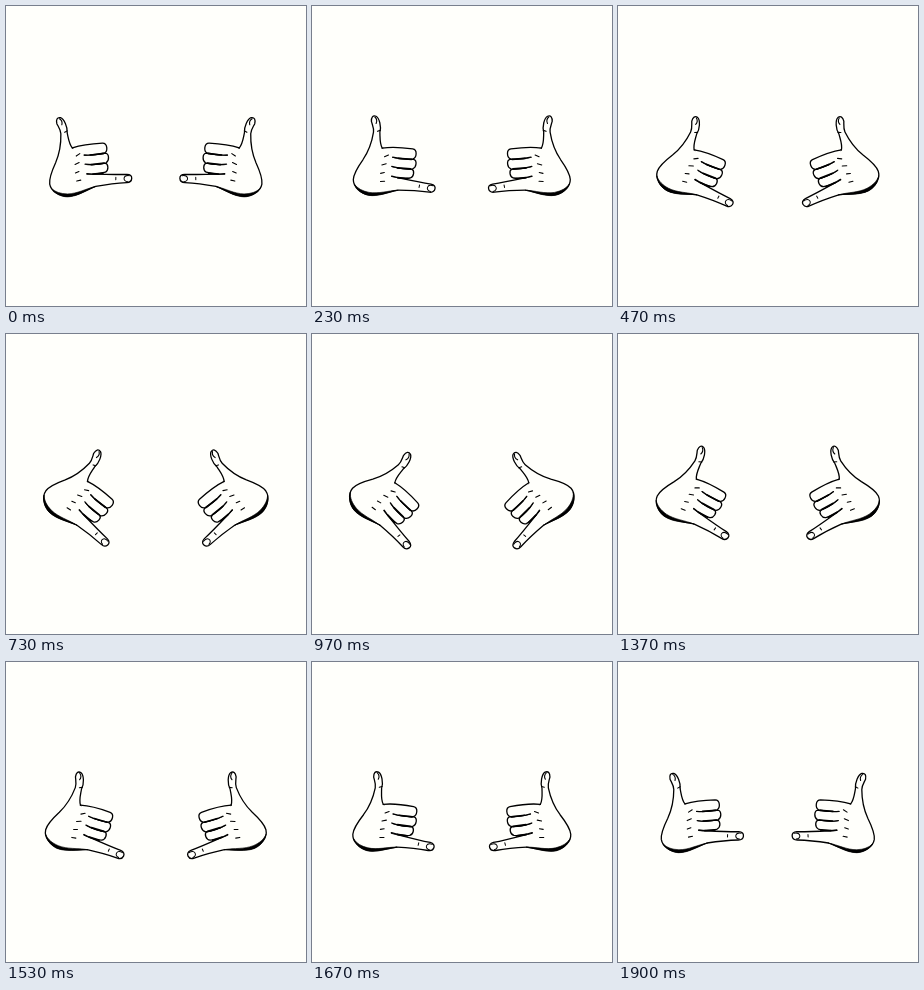
Recreate the animation shown at these times as an HTML page. Size 300 by 300 pixels, loop 1930 ms.

```html
<!DOCTYPE html>
<html>
<head>
<meta charset="utf-8">
<style>
  html, body { margin: 0; width: 100%; height: 100%; overflow: hidden; background: #fffffb; }
  svg { display: block; width: 100vw; height: 100vh; }
</style>
</head>
<body>
<svg viewBox="0 0 300 300">
  <defs>
    <g id="hand" fill="none" stroke="#000" stroke-width="1.3" stroke-linecap="round" stroke-linejoin="round">
      <!-- palm and thumb -->
      <path fill="#fffffb" d="M66 142C62.5 138 62 133 60.5 127C61 121 57 113 53.5 112
        C50 111.5 49 114 50 118C51.5 121 54 124 54.2 128C54.6 137 54 146 49.5 157
        C46 165 43 172 44 178.5C45.5 186 54 190.5 62 190.5C72 190 80 184 90 180L97 166L84 142Z"/>
      <!-- little finger -->
      <path fill="#fffffb" stroke="none" d="M78 167L122 167.2L125.8 171L122 175.4L90 180Z"/>
      <path d="M81 167.8C94 167.8 108 168 121 167.3C124.5 167.3 126 169 125.9 171.3
        C125.8 174 124.2 175.4 121 175.6C110 176.4 100 178 90 180"/>
      <path stroke-width="1" d="M123.5 168.6C117 167.6 116.5 174.6 122 174.6M110 170.5V173"/>
      <!-- folded fingers -->
      <path fill="#fffffb" d="M80 158C87 158.8 93 157.4 99 156.6C102.4 157.2 103 163.5 99.4 165.6C94 167.6 87 168 81 167.4"/>
      <path fill="#fffffb" d="M78 148.8C86 149 93 147.4 99 146.6C103 147 103.4 154 100 156.2C94 158 86 158.6 79 158"/>
      <path fill="#fffffb" d="M66 142C73 139.4 84 137.4 96 136.6C101 136.4 101.8 144.4 98.2 146.4C92 148 85 149.2 78 148.8"/>
      <path stroke-width="1.7" d="M84 148.7L97 147M85 158.2L98 156.6M87 167.7L97 166.6"/>
      <!-- creases -->
      <path stroke-width="1.1" d="M70 150L73.5 147.5M69 158.5L73 156.5M69.5 167L73 165.5M71 175L75 174
        M52.5 113C55 114.5 55.5 117 55 119M58 126.5L60.5 125"/>
      <!-- shaded heel -->
      <path fill="#000" stroke-width=".6" d="M46 183C50 188.5 56 191 62 191C72 190.5 80 184.4 90 180
        C80 182.5 72 187.6 62 188C55 188 50 186.5 46 183Z"/>
    </g>
  </defs>
  <g><use class="turn" href="#hand"/></g>
  <g transform="translate(299.6) scale(-1 1)"><use class="turn" href="#hand"/></g>
</svg>
<script>
  const LOOP = 1930, PEAK = 950, SWING = 51.5, STEP = 100 / 3;
  const hands = document.querySelectorAll('.turn');

  // One cosine swing in and out; the way back is slightly slower.
  function angleAt(t) {
    const phase = (t - PEAK) * (t < PEAK ? 0.003 : 0.00283);
    return SWING * (1 + Math.cos(phase)) / 2;
  }

  function draw() {
    const t = performance.now() % LOOP;
    const stepped = Math.floor((t + 4) / STEP) * STEP;
    const turn = `rotate(${angleAt(stepped)} 67.4 162.8)`;
    hands.forEach(h => h.setAttribute('transform', turn));
    requestAnimationFrame(draw);
  }
  draw();
</script>
</body>
</html>
```
